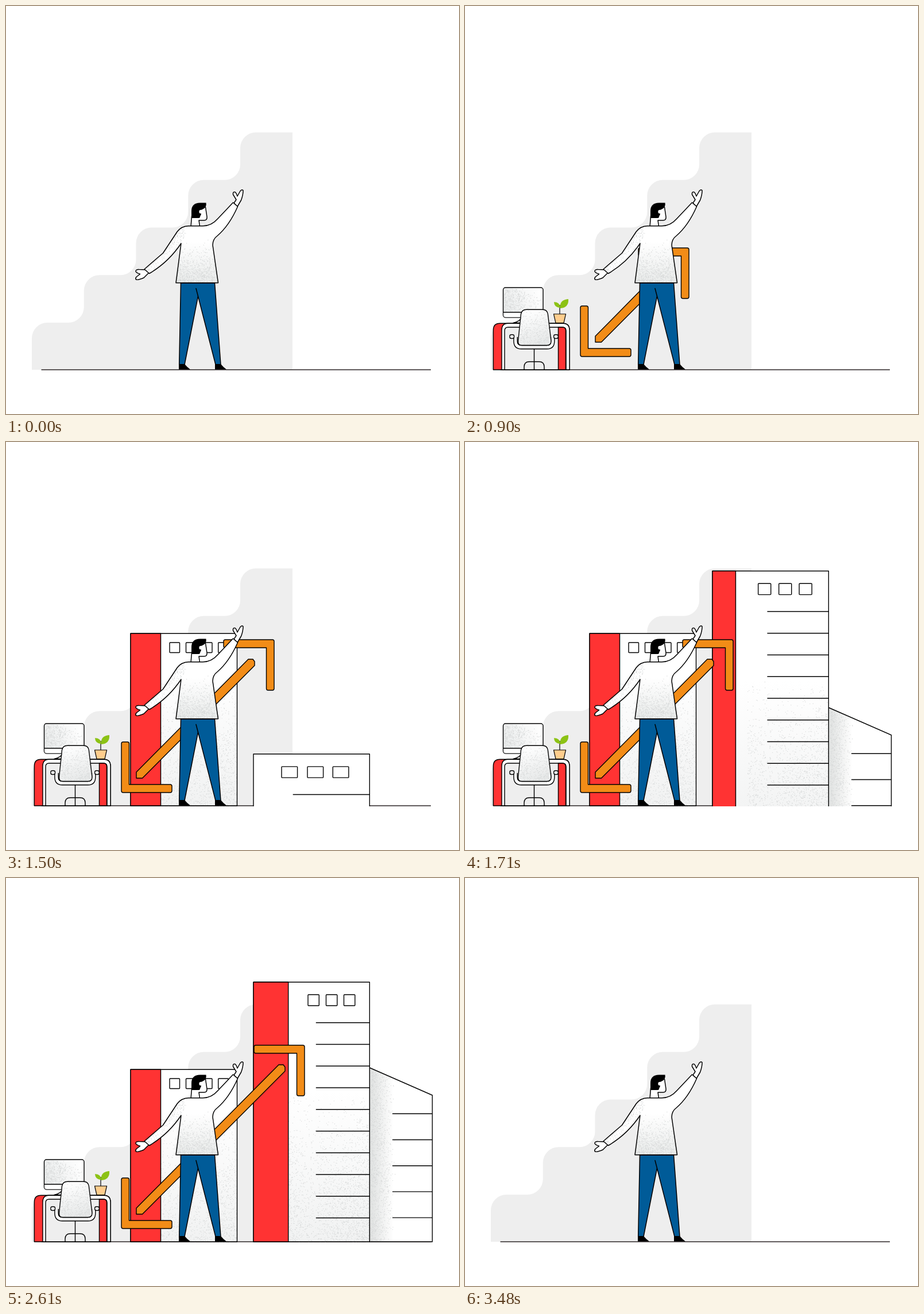
Recreate the animation shown at these times as an HTML page. Size 789 by 710 pixels, loop 3.63 s.

```html
<!DOCTYPE html>
<html lang="en">
<head>
<meta charset="utf-8">
<title>Growing office</title>
<style>
html, body { margin: 0; width: 100%; height: 100%; overflow: hidden; background: #fff; }
svg { display: block; width: 100vw; height: 100vh; }
</style>
</head>
<body>
<svg id="stage" viewBox="0 0 789 710"></svg>
<script>
const LOOP = 3630, STEP = 30, GROUND = 633;
const RED = '#ff3333', ORANGE = '#f28c17', BLUE = '#005b98', GREY = '#eeeeee';
const stage = document.getElementById('stage');

function el(parent, tag, attrs) {
  const node = document.createElementNS('http://www.w3.org/2000/svg', tag);
  set(node, attrs);
  parent.appendChild(node);
  return node;
}
function set(node, attrs) {
  for (const k in attrs) node.setAttribute(k, attrs[k]);
}
const group = (parent, attrs = {}) => el(parent, 'g', attrs);
const path = (parent, d, fill = 'none', attrs = {}) => el(parent, 'path', { d, fill, ...attrs });
const rect = (parent, x, y, width, height, fill, attrs = {}) =>
  el(parent, 'rect', { x, y, width, height, fill, ...attrs });
const plain = { stroke: 'none' };

let seed = 7;
function random() {
  seed = (seed * 16807) % 2147483647;
  return seed / 2147483647;
}

const defs = el(stage, 'defs', {});
let ids = 0;
function clip(d) {
  const id = 'clip' + ids++;
  path(el(defs, 'clipPath', { id }), d, '#000');
  return `url(#${id})`;
}
function fade(x1, y1, x2, y2, from, to) {
  const id = 'fade' + ids++;
  const g = el(defs, 'linearGradient', { id, x1, y1, x2, y2 });
  el(g, 'stop', { offset: 0, 'stop-color': from });
  el(g, 'stop', { offset: 1, 'stop-color': to });
  return `url(#${id})`;
}

// Scatter fine dots; density(u, v) gives the chance at each place in the box.
function grain(parent, x, y, w, h, count, density, shape) {
  let d = '';
  for (let i = 0; i < count; i++) {
    const u = random(), v = random();
    if (random() < density(u, v)) d += `M${(x + u * w).toFixed(1)} ${(y + v * h).toFixed(1)}h1.1v1.1h-1.1z`;
  }
  const attrs = { stroke: 'none' };
  if (shape) attrs['clip-path'] = clip(shape);
  return path(parent, d, '#d6d8d8', attrs);
}

// Backdrop
rect(stage, 0, 0, 789, 710, '#fff');
let stairs = `M45 ${GROUND}V578`;
for (let i = 0; i < 5; i++) {
  const x = 45 + i * 90.75, y = 551 - i * 82.75;
  stairs += `V${y + 27}A27 27 0 0 1 ${x + 27} ${y}`;
  stairs += i < 4 ? `H${x + 63.75}A27 27 0 0 0 ${x + 90.75} ${y - 27}` : `H499V${GROUND}Z`;
}
path(stage, stairs, GREY);
path(stage, `M61.5 ${GROUND}H740`, 'none', { stroke: '#2b2526', 'stroke-width': 1.5 });

const scene = group(stage, {
  'clip-path': clip('M0 0H789V634H0Z'), stroke: '#000', 'stroke-width': 1.4, 'stroke-linejoin': 'round'
});

// Side wing
const wing = group(scene);
const wingShape = 'M633 330L742.5 378V633H633Z';
path(wing, wingShape, '#fff', plain);
rect(wing, 633, 331, 42, 302, fade(0, 0, 1, 0, '#dfe1e0', '#ffffff'), { ...plain, 'clip-path': clip(wingShape) });
grain(wing, 634, 332, 44, 300, 4200, u => Math.pow(1 - u, 1.2) * 0.7, wingShape);
path(wing, wingShape);
for (let i = 0; i < 5; i++) path(wing, `M673 ${410.3 + i * 45.2}H742.5`);

// A tower: red side on the left, white face with windows and floor lines.
function tower(o) {
  const g = group(scene), full = o.right - o.left - o.red;
  const shadeTop = o.top + o.shade, height = GROUND - o.top;
  rect(g, o.left, o.top, o.right - o.left, height, '#fff', plain);
  rect(g, o.left, shadeTop, o.right - o.left, GROUND - shadeTop, fade(0, 0, 0, 1, '#ffffff', '#f1f2f2'), plain);
  grain(g, o.left + o.red, shadeTop, full, GROUND - shadeTop, o.dots,
    (u, v) => v * (0.25 + 0.6 * Math.abs(u - 0.3)));
  rect(g, o.left, o.top, o.right - o.left, height, 'none');
  const side = rect(g, o.left, o.top, 0, height, RED);
  const windows = o.windows.map(() => rect(g, 0, o.top + o.sill, 0, o.pane, '#fff', { rx: 1 }));
  const floors = [];
  for (let i = 0; i < o.floors; i++) {
    floors.push([path(g, ''), o.top + 70.5 + i * 37.75]);
  }
  return (rise, spread) => {
    const red = o.red * spread, k = (o.right - o.left - red) / full;
    set(g, { transform: `translate(0 ${(height + 3) * (1 - rise)})` });
    set(side, { width: red });
    windows.forEach((w, i) => set(w, { x: o.right - (o.right - o.windows[i]) * k, width: o.pane * k }));
    floors.forEach(([f, y]) => set(f, { d: `M${o.right - 93.5 * k} ${y}H${o.right}` }));
  };
}
const tall = tower({
  left: 431, right: 633.3, top: 181.2, red: 60.7, shade: 190, dots: 9000,
  windows: [526, 557.5, 588.5], sill: 21.8, pane: 19.3, floors: 10
});
const low = tower({
  left: 217, right: 402.5, top: 333.2, red: 52.5, shade: 70, dots: 5200,
  windows: [285, 313.5, 341.5, 369.7], sill: 15.8, pane: 17.5, floors: 0
});

// Workplace
const monitor = group(scene);
path(monitor, 'M84 551.5H120V542H98Q96 549 84 551.5Z', '#fff');
rect(monitor, 66.5, 490, 69.5, 52, fade(0, 0.6, 1, 0.3, '#e9ebeb', '#ffffff'), { rx: 4 });
path(monitor, 'M67 533.5H135.5V537Q135.5 541.5 131.5 541.5H71Q67 541.5 67 537Z', '#fff', plain);
grain(monitor, 68, 492, 64, 40, 1500, (u, v) => 0.55 * Math.max(0, 1 - u * 0.9 - Math.abs(v - 0.55) * 0.6));
path(monitor, 'M66.5 533H136');

const desk = group(scene);
path(desk, 'M49.3 633V564Q49.3 552.3 61 552.3H170Q182 552.3 182 564V633Z', RED);
path(desk, 'M64 633V564Q64 552.3 75 552.3H170Q182 552.3 182 564V633Z', '#fff');
path(desk, 'M69 633V565Q69 559 75 559H170Q176 559 176 565V633Z', GREY);
path(desk, 'M162.5 633V559H170Q175.5 559 175.5 565V633Z', RED);

const chair = group(scene);
path(chair, 'M120.5 597V633M103 633V628Q103 619 112 619H129Q138 619 138 628V633');
const arms = 'M88 576V583Q88 593.7 98 593.7H143Q152.7 593.7 152.7 583V576';
path(chair, arms, 'none', { 'stroke-width': 7.6 });
path(chair, arms, 'none', { stroke: '#fff', 'stroke-width': 4.8 });
for (const x of [78, 154.7]) rect(chair, x, 572, 7.5, 6.5, '#fff', { rx: 2.5 });
const back = 'M107 528.3H135Q143 528.3 144.3 536L150 583Q150 590.5 143 590.5H99Q92 590.5 92.5 583L97.5 536Q99 528.3 107 528.3Z';
path(chair, back, fade(0.3, 0, 0.6, 1, '#ffffff', '#e6e8e8'), plain);
grain(chair, 92, 528, 58, 63, 1500, (u, v) => 0.5 * Math.min(1, v * 0.8 + Math.abs(u - 0.4) * 0.4), back);
path(chair, back);

const plant = group(scene);
path(plant, 'M165 537V520', 'none', { 'stroke-width': 1.2 });
path(plant, 'M166 526Q164 511 180 510Q181 525 166 526Z', '#8cc215', plain);
path(plant, 'M166 525.5Q155 524.5 155 515Q165.5 515 166 525.5Z', '#8cc215', plain);
path(plant, 'M154.5 536H175.5L172 551.5H158Z', '#ffcd8d', { 'stroke-width': 1.2 });

// Arrow, with the lower corner as origin
const arrow = group(scene);
const shaft = path(arrow, '', ORANGE);
const bracket = 'M0 -3V-85Q0 -88 3 -88H10.5Q13.5 -88 13.5 -85V-14H85Q88 -14 88 -11V-3Q88 0 85 0H3Q0 0 0 -3Z';
path(arrow, bracket, ORANGE);
const head = path(arrow, bracket, ORANGE);

function drawArrow(scale, reach) {
  const r = reach;
  set(shaft, { d: `M26 -35.5V-25H36.5L${r - 34} ${45 - r}L${r - 34} ${38 - r}L${r - 37} ${34 - r}H${r - 45}Z` });
  set(head, { transform: `translate(${r} ${-r}) rotate(180)` });
  set(arrow, {
    transform: `translate(201 610) scale(${scale})`,
    visibility: scale > 0.005 ? 'visible' : 'hidden'
  });
}

// Man
const man = group(stage, { stroke: '#000', 'stroke-width': 1.5, 'stroke-linejoin': 'round', 'stroke-linecap': 'round' });
path(man, 'M304.5 482L301.7 624H311L334.5 505L365 624H374L363.5 482Z', BLUE);
path(man, 'M331 491.5L334.5 505');
for (const x of [301, 364]) path(man, `M${x} 632.5V623H${x + 10}Q${x + 14} 628 ${x + 20} 632.5Z`, '#000', plain);
path(man, 'M323.5 366L322 384H337.5L336 373H345Q350.5 373 350 367L347.5 350H328Z', '#fff');
path(man, 'M323 369V357Q323 342.5 338 342.5H348.5Q350 350 343 353.5L340 355V362L337 369Z', '#000', plain);
el(man, 'circle', { cx: 339.5, cy: 358, r: 3.2, fill: '#fff', stroke: 'none' });
path(man, 'M243 459L232 458.5Q226.5 458 226 461.5Q226 464 233.5 466.5L227 471.5Q225 474 226.5 476Q229 477.5 240 473L249 464Z', '#fff');
path(man, 'M397 343L401 337L395.5 328Q395 323.5 398 323.5Q400.5 323.5 403 331L408 322Q411 318.5 413 321Q413 329 409.5 338L403 349Z', '#fff');
const shirt = 'M318 382.7Q305 383 298 393L273.5 430L241 458L249.5 465.5Q283 446 305 413L296 481.7H369.5L360 416Q360 406 368 400Q389 382 403.5 349L395.5 342L369 370Q358 382.7 343 382.7Z';
path(man, shirt, '#fff', plain);
rect(man, 290, 410, 82, 72, fade(0, 0, 0, 1, '#ffffff', '#e9ebea'), { ...plain, 'clip-path': clip(shirt) });
grain(man, 295, 400, 76, 82, 3600, (u, v) => v * v * (0.8 - 0.3 * u), shirt);
grain(man, 241, 388, 72, 76, 2600, (u, v) => 0.5 * Math.max(0, 1 - Math.abs(u + v - 0.9) * 3), shirt);
path(man, shirt);

// Timing
const clamp = x => Math.min(1, Math.max(0, x));
const easeOut = (t, start, length, power = 4) => 1 - Math.pow(1 - clamp((t - start) / length), power);

function draw(t) {
  const stay = 1 - Math.pow(clamp((t - 3090) / 390), 3);
  const slide = (node, height, start, length = 525) => set(node, {
    transform: `translate(0 ${(height + 3) * (1 - easeOut(t, start, length) * stay)})`
  });
  slide(monitor, 143, 330);
  slide(desk, 81, 330);
  slide(chair, 105, 390);
  slide(plant, 123, 435);
  slide(wing, 303, 1601, 575);
  low(easeOut(t, 1070, 350, 3) * stay, easeOut(t, 1060, 320, 3) * stay);
  tall(easeOut(t, 1470, 540) * stay, easeOut(t, 1590, 500) * stay);
  drawArrow(
    easeOut(t, 330, 470) * stay,
    189 + 77 * easeOut(t, 1070, 350, 3) + 53 * easeOut(t, 1710, 500)
  );
}

const begin = performance.now();
function tick() {
  const t = (performance.now() - begin) % LOOP;
  draw(Math.floor(t / STEP) * STEP);
  requestAnimationFrame(tick);
}
tick();
</script>
</body>
</html>
```
